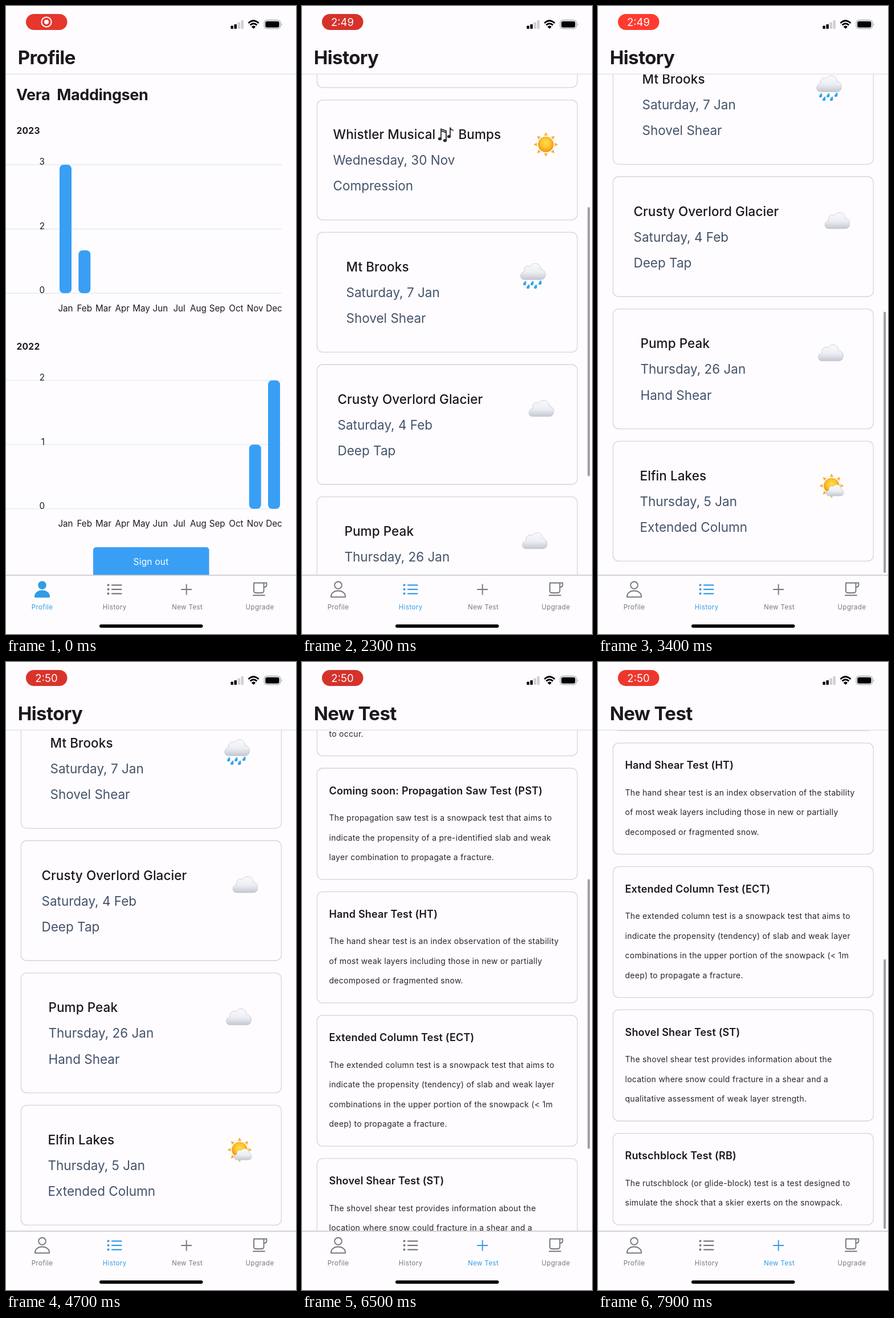
Animation of 509 by 1100 pixels, one loop 8000 ms. Source, as an HTML page:

```html
<!DOCTYPE html>
<html lang="en">
<head>
<meta charset="utf-8">
<title>Snow test app</title>
<style>
html, body { margin: 0; width: 100%; height: 100%; overflow: hidden; background: #fefcff; }
svg { display: block; width: 100%; height: 100%; }
text { font-family: Inter, "Open Sans", sans-serif; fill: #1b191e; white-space: pre; }
.title { font-size: 33px; font-weight: 700; letter-spacing: -.6px; }
.name { font-size: 27px; font-weight: 700; letter-spacing: -.4px; }
.year { font-size: 15.5px; font-weight: 700; letter-spacing: .3px; }
.axis { font-size: 15.2px; }
.button { font-size: 15.5px; letter-spacing: .2px; fill: #fff; }
.clock { font-size: 18.5px; fill: #fff; }
.place { font-size: 22.5px; font-weight: 500; letter-spacing: .07px; }
.detail { font-size: 22.5px; fill: #44536a; }
.test { font-size: 18px; font-weight: 600; letter-spacing: .18px; }
.body { font-size: 14px; letter-spacing: .28px; fill: #29272c; }
.card { fill: none; stroke: #d5d4da; stroke-width: 1.3; }
.grid { stroke: #dfebf5; stroke-width: 1.3; }
.bar { fill: #389ff4; }
.tab { color: #77767b; fill: none; stroke: currentColor; stroke-width: 1.9; stroke-linecap: round; stroke-linejoin: round; }
.tab text { font-size: 11.5px; letter-spacing: .4px; fill: currentColor; stroke: none; }
.tab.on { color: #329be6; }
.tab.on .fillable { fill: currentColor; }
</style>
</head>
<body>
<svg viewBox="0 0 509 1100">
  <defs>
    <clipPath id="view"><rect y="119" width="509" height="878"/></clipPath>
    <clipPath id="chart"><rect width="484" height="1100"/></clipPath>
    <radialGradient id="sunFill" cy=".4">
      <stop offset="0" stop-color="#ffdf45"/><stop offset=".6" stop-color="#fdc52f"/><stop offset="1" stop-color="#f3a01f"/>
    </radialGradient>
    <linearGradient id="cloudFill" x2="0" y2="1">
      <stop offset="0" stop-color="#fafafc"/><stop offset=".55" stop-color="#eceef3"/><stop offset="1" stop-color="#c3c7d1"/>
    </linearGradient>
    <path id="cloud" d="M-15 14C-24 14-24 1-15 0C-17-9-9-12-5-9C-1-17 14-16 14-4C24-4 25 14 14 14Z"
      fill="url(#cloudFill)" stroke="#c2c5ce" stroke-width=".8"/>
    <path id="drop" d="M2-4C4 1 3 4 0 4C-4 4-3 0 2-4Z" fill="#35a5e6"/>
    <g id="sun"></g>
    <g id="partly"><use href="#sun"/><use href="#cloud" transform="translate(6 8) scale(.7)"/></g>
    <g id="rain"><use href="#cloud" y="-8"/></g>
    <g id="snow" stroke="#73bee8" stroke-width="3" stroke-linecap="round" fill="none"></g>
    <g id="hands">
      <path d="M-14 6L-6 2L-2 10L-4 14L-14 13ZM14 6L6 2L2 10L4 14L14 13Z" fill="#3f8fc4"/>
      <path d="M-1-13Q-4-12-4-6L-8 3L-5 9Q0 8 0 2L0-12ZM1-13Q4-12 4-6L8 3L5 9Q0 8 0 2L0-12Z" fill="#f5d3b3" stroke="#c79a78" stroke-width=".9"/>
    </g>
    <g id="notes" fill="#2b2c30" stroke="#2b2c30" stroke-width="1.8">
      <path d="M-9 8V-9L0-6V10M-9-6L0-3M7 3V-12Q8-7 13-7" fill="none"/>
      <ellipse cx="-11" cy="8" rx="2.4" ry="1.8"/><ellipse cx="-2" cy="11" rx="2.4" ry="1.8"/><ellipse cx="5" cy="4" rx="2.4" ry="1.8"/>
    </g>
  </defs>
  <rect width="509" height="1100" fill="#fefcff"/>
  <g clip-path="url(#view)">
    <g id="profile"></g>
    <g id="history"></g>
    <g id="tests"></g>
  </g>
  <rect id="thumb" x="501.3" width="4" rx="2" fill="#9d9ca1"/>
  <path d="M0 119.3H509" stroke="#e5e3e9" stroke-width="1.4"/>
  <path d="M0 997H509" stroke="#c6c5ca" stroke-width="1.6"/>
  <text id="heading" class="title" x="20.7" y="102"></text>

  <rect id="pill" x="35" y="14" width="72.5" height="28" rx="14"/>
  <g id="record" fill="none" stroke="#fff" stroke-width="2"><circle cx="71" cy="28" r="8.6"/><circle cx="71" cy="28" r="4" fill="#fff" stroke="none"/></g>
  <text id="clock" class="clock" x="71" y="34.6" text-anchor="middle"></text>
  <g id="status">
    <rect x="394.5" y="34.5" width="4.5" height="5.5" rx="1"/><rect x="400.5" y="32" width="4.5" height="8" rx="1"/>
    <g fill="#cfced3"><rect x="406.5" y="28.5" width="4.5" height="11.5" rx="1"/><rect x="412.5" y="25" width="4.5" height="15" rx="1"/></g>
    <path d="M425.5 30Q434.5 21.5 443.5 30M428.6 33.5Q434.5 28 440.4 33.5" fill="none" stroke="#000" stroke-width="3"/>
    <path d="M434.5 40L430.8 36.2Q434.5 33 438.2 36.2Z"/>
    <rect x="453.2" y="24.7" width="28.3" height="15" rx="4.5" fill="none" stroke="#a5a4a9" stroke-width="1.3"/>
    <rect x="455.2" y="26.7" width="24.3" height="11" rx="2.7"/>
    <path d="M483 29.7Q486 32.2 483 34.7Z" fill="#a5a4a9"/>
  </g>

  <g class="tab">
    <circle class="fillable" cx="63.5" cy="1014.5" r="6.3"/>
    <path class="fillable" d="M51 1035.3C50 1020.5 77 1020.5 76 1035.3Z"/>
    <text x="63.5" y="1057.3" text-anchor="middle">Profile</text>
  </g>
  <g class="tab">
    <path d="M186 1014.3H202.5M186 1021.8H202.5M186 1029.3H202.5" stroke-width="2.2"/>
    <path d="M179.5 1014.3h.01M179.5 1021.8h.01M179.5 1029.3h.01" stroke-width="4"/>
    <text x="190.7" y="1057.3" text-anchor="middle">History</text>
  </g>
  <g class="tab">
    <path d="M308 1022H325.5M316.75 1013.2V1030.8"/>
    <text x="318.2" y="1057.3" text-anchor="middle">New Test</text>
  </g>
  <g class="tab">
    <path d="M435 1010.5H457.5V1014Q457.5 1018 452.5 1018M452.5 1010.5V1024Q452.5 1028 448.5 1028H439Q435 1028 435 1024V1010.5M434 1032.3H454"/>
    <text x="445.5" y="1057.3" text-anchor="middle">Upgrade</text>
  </g>
  <rect x="164" y="1083.3" width="181.5" height="5.6" rx="2.8"/>
</svg>
<script>
const $ = id => document.getElementById(id);
const text = (cls, x, y, s, anchor = 'start') =>
  `<text class="${cls}" x="${x}" y="${y}" text-anchor="${anchor}">${s}</text>`;
const card = (y, h) => `<rect class="card" x="26.3" y="${y}" width="457" height="${h}" rx="10"/>`;
const icon = (id, x, y) => `<use href="#${id}" x="${x}" y="${y}"/>`;
const spokes = (n, d, attrs = '') => Array.from({ length: n }, (_, i) =>
  `<path d="${d}" ${attrs} transform="rotate(${i * 360 / n})"/>`).join('');

$('sun').innerHTML = spokes(8, 'M-3.2-15.5L0-21.7L3.2-15.5Z', 'fill="#f8b32c"') +
  '<circle r="13.5" fill="url(#sunFill)" stroke="#efa526" stroke-width=".6"/>';
$('snow').innerHTML = spokes(6, 'M0 0V-21M-6-19L0-13L6-19M-5-11L0-6L5-11') +
  `<g stroke="#c4e7f8" stroke-width="1">${spokes(6, 'M0 0V-20')}</g>`;
$('rain').innerHTML += [[-15, 12], [-2, 12], [12, 11], [-9, 18], [4, 18]].map(p => icon('drop', ...p)).join('');

// Profile charts
const MONTHS = 'Jan Feb Mar Apr May Jun Jul Aug Sep Oct Nov Dec'.split(' ');
function chart(year, top, labels, bars) {
  const base = top + 225, center = i => 104.5 + i * 33.27;
  return text('year', 18.5, top - 54, year) +
    labels.map((s, i) => `<path class="grid" d="M0 ${top + i * 112.5}H484"/>` +
      text('axis', 68, top + i * 112.5 + .3, s, 'end')).join('') +
    bars.map(([i, h]) => `<rect class="bar" x="${center(i) - 10.5}" y="${base - h}" width="21" height="${h}" rx="7"/>`).join('') +
    MONTHS.map((m, i) => text('axis', center(i), base + 31.5, m, 'middle')).join('');
}
$('profile').innerHTML = text('name', 18, 164.5, 'Vera  Maddingsen') +
  `<g clip-path="url(#chart)">${chart(2023, 278, [3, 2, 0], [[0, 225], [1, 75]])}
  ${chart(2022, 655.7, [2, 1, 0], [[10, 112.5], [11, 225]])}</g>` +
  '<rect class="bar" x="153" y="948" width="203.5" height="60" rx="5"/>' +
  text('button', 254.5, 978.5, 'Sign out', 'middle');

// History cards: x, place, date, test, icon, icon x, icon offset
const PITCH = 231.7, TOP = 129.7;
const VISITS = [
  [65, 'Lower Body Bag Bowl', 'Thursday, 8 Dec', 'Shovel Shear', 'partly', 418, 78],
  [75.5, 'Prayer', 'Saturday, 3 Dec', 'Hand Shear', 'snow', 407, 78],
  [54.5, 'Whistler Musical', 'Wednesday, 30 Nov', 'Compression', 'sun', 428, 78],
  [77.5, 'Mt Brooks', 'Saturday, 7 Jan', 'Shovel Shear', 'rain', 405.5, 77],
  [62.5, 'Crusty Overlord Glacier', 'Saturday, 4 Feb', 'Deep Tap', 'cloud', 420, 77],
  [74.5, 'Pump Peak', 'Thursday, 26 Jan', 'Hand Shear', 'cloud', 408.5, 77],
  [73.5, 'Elfin Lakes', 'Thursday, 5 Jan', 'Extended Column', 'partly', 410, 78],
];
$('history').innerHTML = VISITS.map(([x, place, date, test, id, ix, iy], i) => {
  const y = TOP + i * PITCH;
  return card(y, 210) + text('place', x, y + 68.5, place) + text('detail', x, y + 113.7, date) +
    text('detail', x, y + 158.8, test) + icon(id, ix, y + iy);
}).join('') +
  icon('hands', 167, TOP + PITCH + 61) + text('place', 188.5, TOP + PITCH + 68.5, 'Flags') +
  icon('notes', 253, TOP + 2 * PITCH + 60) + text('place', 274.5, TOP + 2 * PITCH + 68.5, 'Bumps');

// Test descriptions
const TESTS = [
  ['Compression Test (CT)', 'The compression test is used to locate weak layers in the',
    'upper snowpack (approximately 1 m) and provide an',
    'indication of their triggering potential on nearby slopes with', 'similar snowpack conditions.'],
  ['Deep Tap Test (DT)', 'The deep tap test is used to determine the fracture',
    'character of a weak layer that is too deep to fracture',
    'consistently in the compression test. In addition, it is',
    'possible to observe the tapping force required for fracture', 'to occur.'],
  ['Coming soon: Propagation Saw Test (PST)', 'The propagation saw test is a snowpack test that aims to',
    'indicate the propensity of a pre-identified slab and weak', 'layer combination to propagate a fracture.'],
  ['Hand Shear Test (HT)', 'The hand shear test is an index observation of the stability',
    'of most weak layers including those in new or partially', 'decomposed or fragmented snow.'],
  ['Extended Column Test (ECT)', 'The extended column test is a snowpack test that aims to',
    'indicate the propensity (tendency) of slab and weak layer',
    'combinations in the upper portion of the snowpack (&lt; 1m', 'deep) to propagate a fracture.'],
  ['Shovel Shear Test (ST)', 'The shovel shear test provides information about the',
    'location where snow could fracture in a shear and a', 'qualitative assessment of weak layer strength.'],
  ['Rutschblock Test (RB)', 'The rutschblock (or glide-block) test is a test designed to',
    'simulate the shock that a skier exerts on the snowpack.'],
];
let cardTop = TOP;
$('tests').innerHTML = TESTS.map(([title, ...lines]) => {
  const y = cardTop, h = 91.3 + 34.5 * lines.length;
  cardTop += h + 21.6;
  return card(y, h) + text('test', 47.5, y + 45.5, title) +
    lines.map((s, i) => text('body', 47.5, y + 92 + i * 34.5, s)).join('');
}).join('');

// Timeline: [ms, scroll offset]
const SCREENS = [
  { id: 'profile', title: 'Profile', start: 0, scroll: [[0, 0]], bar: [0, 0], max: 0 },
  { id: 'history', title: 'History', start: 700, bar: [1300, 4200], max: 743.5,
    scroll: [[1300, 0], [1600, 78], [1800, 220], [2000, 340], [2300, 428.5], [2500, 455], [2800, 610],
      [3100, 735], [3400, 757.5], [3600, 749], [3900, 743.5]] },
  { id: 'tests', title: 'New Test', start: 5000, bar: [5900, 8000], max: 740.5,
    scroll: [[5900, 0], [6100, 23], [6300, 235], [6500, 480], [6700, 680], [6900, 758], [7100, 751], [7500, 740.5]] },
];
function sample(points, t) {
  const i = points.findIndex(p => p[0] > t);
  if (i < 0) return points[points.length - 1][1];
  if (i === 0) return points[0][1];
  const [[t0, a], [t1, b]] = [points[i - 1], points[i]];
  return a + (b - a) * (t - t0) / (t1 - t0);
}
const show = (id, on) => $(id).setAttribute('display', on ? 'inline' : 'none');
const tabs = document.querySelectorAll('.tab');

function draw(now) {
  const t = Math.floor(now % 8000 / 100) * 100;
  const current = SCREENS.filter(s => s.start <= t).pop();
  SCREENS.forEach((s, i) => {
    show(s.id, s === current);
    tabs[i].classList.toggle('on', s === current);
  });
  $('heading').textContent = current.title;

  const y = sample(current.scroll, t);
  $(current.id).setAttribute('transform', `translate(0 ${-y})`);

  // The thumb shrinks while the list is pulled past its end.
  const ratio = 871 / (current.max + 878), over = Math.max(0, y - current.max);
  show('thumb', t >= current.bar[0] && t < current.bar[1]);
  $('thumb').setAttribute('y', 122 + Math.min(y, current.max) * ratio + over);
  $('thumb').setAttribute('height', 878 * ratio - over);

  const glow = .5 + .5 * Math.cos((t - 1450) / 1000 * Math.PI);
  const mix = (a, b) => Math.round(a + (b - a) * glow);
  $('pill').setAttribute('fill', `rgb(${mix(212, 255)},${mix(50, 59)},${mix(43, 48)})`);
  show('record', t < 500);
  $('clock').textContent = t < 500 ? '' : t < 4500 ? '2:49' : '2:50';
}
const begin = performance.now();
function tick() {
  draw(performance.now() - begin);
  requestAnimationFrame(tick);
}
tick();
</script>
</body>
</html>
```
